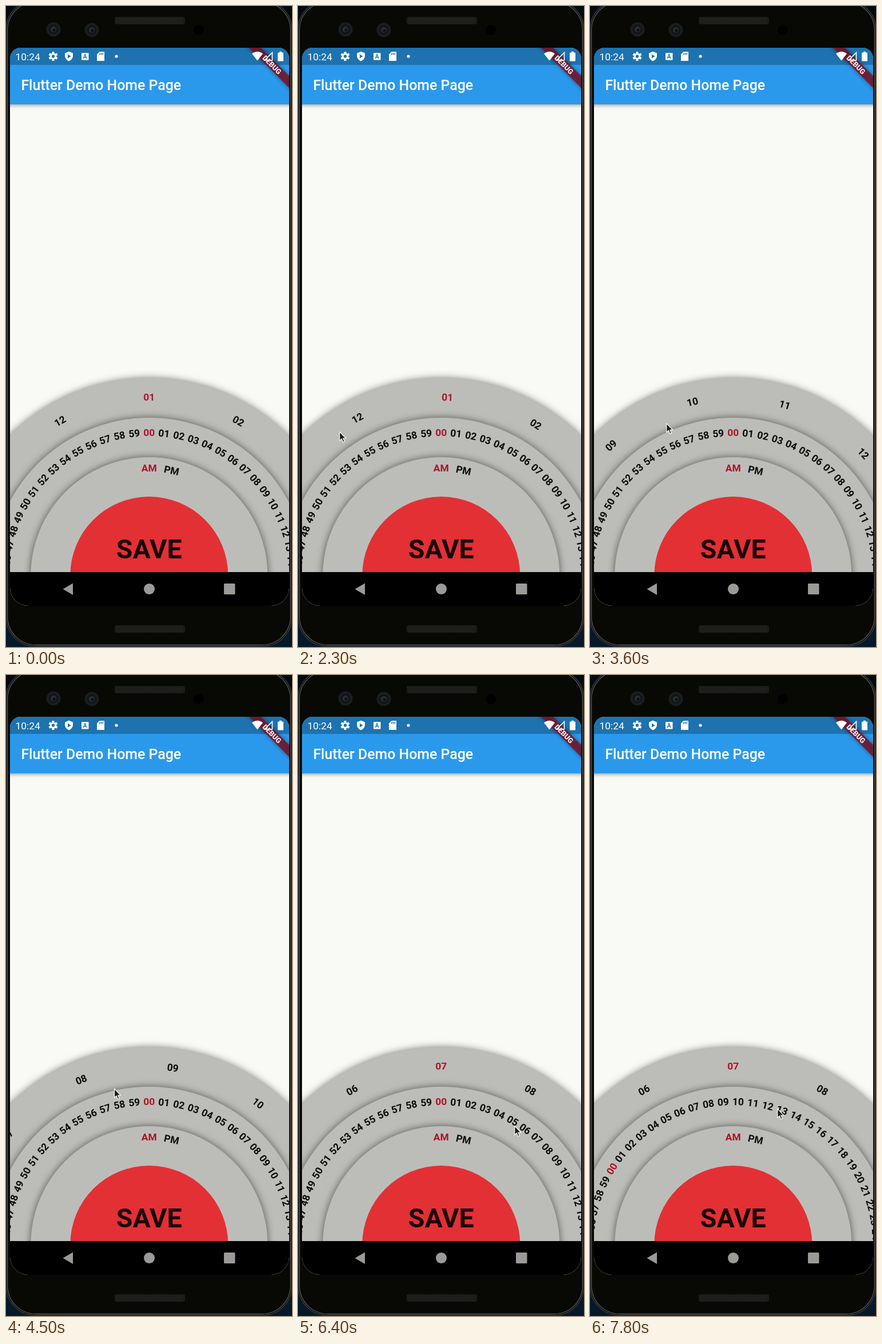
An HTML page with a canvas for the animation above (8000 ms loop, 500x1121 px).

```html
<!DOCTYPE html>
<html lang="en">
<head>
<meta charset="utf-8">
<title>Radial time picker</title>
<style>
  html, body { margin: 0; width: 100%; height: 100%; overflow: hidden; background: #040b12; }
  canvas { display: block; width: 500px; height: 1121px; }
</style>
</head>
<body>
<canvas id="stage" width="500" height="1121"></canvas>
<script>
const ctx = document.getElementById('stage').getContext('2d');
const TAU = Math.PI * 2, RAD = Math.PI / 180;
const LOOP = 8000, STEP = 100, SNAP = 5500;
const DP = 1.2427;
const CX = 250.3, CY = 996, BAND = 69;
const INK = '#0c0c0a', PICKED = '#b11224', GREY = '#bcbdb9';
const WHITE = '#fff', STATUS = '#1d72af';

// Motion
const mix = (a, b, k) => a + (b - a) * k;
const progress = (t, from, to) => Math.min(1, Math.max(0, (t - from) / (to - from)));

const hourDrag = t => progress(t, 2300, 5300) ** 0.985;
const minuteDrag = t => 1 - (1 - progress(t, 6700, 7800)) ** 2.5;

function hourTurn(t) {
  if (t < 2300) return 0;
  return t < SNAP ? mix(2, 172.5, hourDrag(t)) : 180;
}
const minuteTurn = t => -58 * minuteDrag(t);

function cursorAt(t) {
  if (t < 1200) {
    const k = progress(t, 600, 1100), swing = Math.sin(k * Math.PI);
    return [mix(111, 80, k) + 45 * swing, mix(807, 766, k) + 30 * swing];
  }
  if (t < 2300) {
    const k = progress(t, 1200, 1400);
    return [mix(80, 72, k), mix(766, 744, k)];
  }
  if (t < 5800) {
    const k = hourDrag(t);
    return [mix(72, 243, k ** 1.25), mix(744, 718, k ** 0.7)];
  }
  const go = progress(t, 5800, 6400), back = minuteDrag(t);
  return [mix(243, 378, go) - 51 * back, mix(718, 788, go) - 30 * back];
}

// Drawing helpers
function rect(x, y, w, h, r, fill) {
  ctx.beginPath();
  ctx.roundRect(x, y, w, h, r);
  if (fill) { ctx.fillStyle = fill; ctx.fill(); }
}
function disc(x, y, r, fill) {
  ctx.beginPath();
  ctx.arc(x, y, r, 0, TAU);
  ctx.fillStyle = fill;
  ctx.fill();
}
function shape(d, fill, line, width) {
  const path = new Path2D(d);
  if (fill) { ctx.fillStyle = fill; ctx.fill(path); }
  if (line) { ctx.strokeStyle = line; ctx.lineWidth = width; ctx.stroke(path); }
}
function stroke(color, width) {
  ctx.strokeStyle = color;
  ctx.lineWidth = width;
  ctx.stroke();
}
function shadow(alpha, blur, dy = 0) {
  ctx.shadowColor = `rgba(0,0,0,${alpha})`;
  ctx.shadowBlur = blur;
  ctx.shadowOffsetY = dy;
}
function text(s, x, y, size, weight, color, align = 'center') {
  ctx.font = `${weight} ${size}px Roboto, sans-serif`;
  ctx.textAlign = align;
  ctx.fillStyle = color;
  ctx.fillText(s, x, y);
}
function group(x, y, deg, paint) {
  ctx.save();
  ctx.translate(x, y);
  ctx.rotate(deg * RAD);
  paint();
  ctx.restore();
}

// Phone
function speaker(y) {
  rect(190, y, 123, 13, 3, '#1b1b1a');
  ctx.fillStyle = '#2c2c2b';
  for (let j = 0; j < 4; j++)
    for (let i = 0; i < 39; i++) ctx.fillRect(192 + i * 3 + (j % 2), y + 2 + j * 2.7, 1.2, 1.2);
}
function lens(x, y) {
  disc(x, y, 12.5, '#1b1e20');
  disc(x, y, 8.5, '#121518');
  disc(x, y, 5, '#2a2e32');
  disc(x + 1, y + 1, 2.5, '#0c0e10');
}
function phone() {
  const bg = ctx.createLinearGradient(0, 0, 0, 1121);
  bg.addColorStop(0, '#030a12');
  bg.addColorStop(1, '#06192a');
  ctx.fillStyle = bg;
  ctx.fillRect(0, 0, 500, 1121);
  rect(0, -10, 500, 1130, 52, '#050604');
  stroke('#3c3d3c', 1.5);
  rect(2.5, -7.5, 495, 1125, 50, '#080905');
  stroke('#5d5e5c', 1.3);
  speaker(19);
  speaker(1083);
  lens(83, 41);
  lens(150, 42);
  disc(337, 42, 9, '#000');
}

// App bar
function gear(x, y) {
  disc(x, y, 5.8, WHITE);
  for (let i = 0; i < 6; i++) group(x, y, i * 60, () => ctx.fillRect(-2, -8, 4, 4));
  disc(x, y, 2.7, STATUS);
}
function statusIcons() {
  text('10:24', 16.5, 95, 14 * DP, 400, WHITE, 'left');
  gear(82.5, 88);
  shape('M110 79.5l7 3v5.5q-1 6-7 8.5q-6-2.5-7-8.5v-5.5z', WHITE);
  shape('M108 84.5v7l5.5-3.5z', STATUS);
  rect(132, 82, 12.5, 12.5, 1, WHITE);
  text('A', 138.2, 92, 10, 700, STATUS);
  shape('M163.5 80h8.5v16h-13v-11.5z', WHITE);
  ctx.fillStyle = STATUS;
  for (let i = 0; i < 3; i++) ctx.fillRect(163.3 + i * 2.7, 82, 1.4, 3.5);
  disc(193, 88, 2.6, WHITE);
}
function radioIcons() {
  shape('M439.5 95.5l-9.5-12q9.5-7.5 19 0z', WHITE);
  shape('M465.5 81.5v13.5h-13.5z', null, WHITE, 1.6);
  rect(475, 81.5, 10, 15, 1.2, WHITE);
  ctx.fillRect(478, 79.7, 4, 3);
}
function banner() {
  group(495, 73, 45, () => {
    shadow(0.5, 7);
    ctx.fillStyle = 'rgba(124,18,38,.82)';
    ctx.fillRect(-60, 28 * DP, 120, 12 * DP);
    shadow(0, 0);
    text('DEBUG', 0, 46.8, 10.2 * DP, 900, '#f4e4e8');
  });
}
function appBar() {
  ctx.save();
  shadow(0.36, 6, 2);
  ctx.fillStyle = '#2b99eb';
  ctx.fillRect(0, 73, 500, 99);
  ctx.restore();
  ctx.fillStyle = STATUS;
  ctx.fillRect(7, 73, 488, 30);
  text('Flutter Demo Home Page', 26.4, 147, 20 * DP, 500, WHITE, 'left');
  statusIcons();
  banner();
  radioIcons();
}

// Picker
function ring(r) {
  ctx.save();
  shadow(0.55, 13);
  disc(CX, CY, r, GREY);
  ctx.restore();
}
function label(s, deg, r, picked) {
  group(CX, CY, deg, () => text(s, 0, 6.2 - r, 14 * DP, 700, picked ? PICKED : INK));
}
function dial(first, count, turn, r, picked) {
  for (let i = 0; i < count; i++) {
    const n = first + i;
    label(String(n).padStart(2, '0'), i * 360 / count + turn, r, n === picked);
  }
}
function picker(t) {
  ring(BAND * 5);
  dial(1, 12, hourTurn(t), 312, t < SNAP ? 1 : 7);
  ring(BAND * 4);
  dial(0, 60, minuteTurn(t), 250, 0);
  ring(BAND * 3);
  label('AM', 0, 188, true);
  label('PM', 12, 188, false);
  disc(CX, CY, BAND * 2, '#e33035');
  text('SAVE', 250.3, 966, 46.6, 700, '#1b0506');
}
function navBar() {
  const c = '#9b9a96';
  ctx.fillStyle = '#000';
  ctx.fillRect(7, 990, 488, 59);
  shape('M117 1009.5v20.5l-17.5-10.2z', c);
  disc(250.5, 1019.5, 9.5, c);
  rect(381, 1010, 19.5, 19, 1.5, c);
}
function cursor(t) {
  if (t < 500) return;
  const [x, y] = cursorAt(t);
  group(x + 0.7, y + 0.7, 0, () => {
    ctx.lineJoin = 'round';
    shape('M0 0v15.5l3.6-3.3 2.4 5.8 2.6-1-2.4-5.7h4.8z', '#1b1b1b', WHITE, 1.2);
  });
}

function draw(t) {
  phone();
  ctx.save();
  rect(7, 73, 488, 976, [19, 19, 32, 32], '#f9faf5');
  ctx.clip();
  appBar();
  picker(t);
  navBar();
  ctx.restore();
  cursor(t);
}

const start = performance.now();
function frame() {
  const t = (performance.now() - start) % LOOP;
  draw(Math.floor(t / STEP) * STEP);
  requestAnimationFrame(frame);
}
frame();
</script>
</body>
</html>
```
